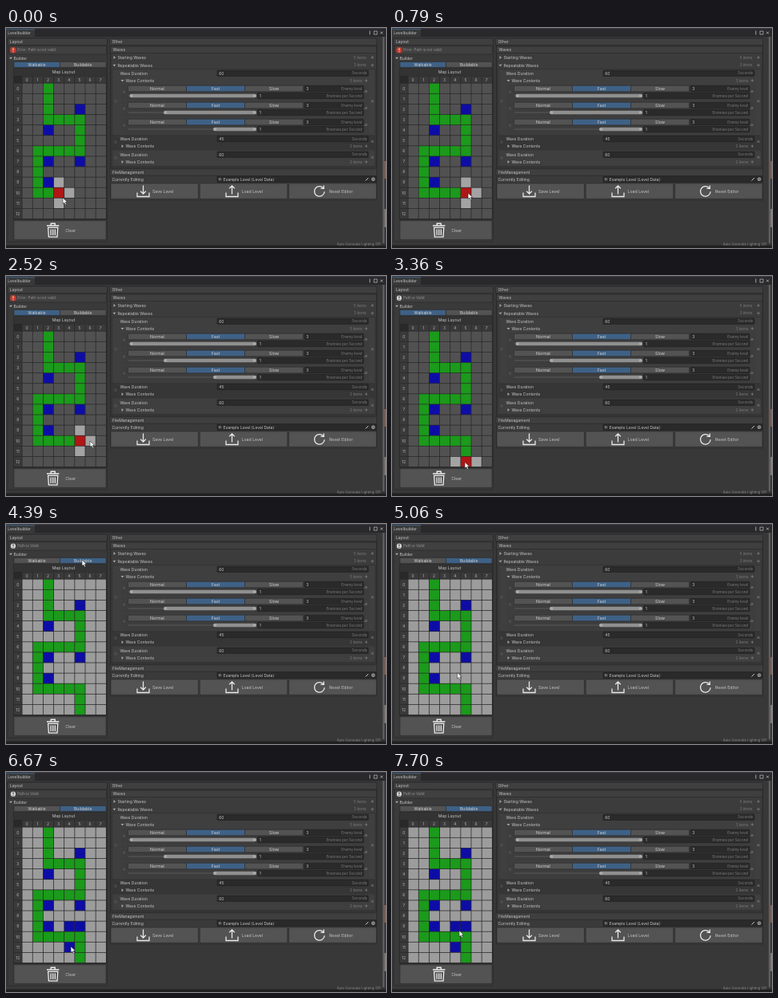
Recreate the animation shown at these times as an HTML page. Size 475 px wide and 276 px high, loop 7.73 s.

```html
<!DOCTYPE html>
<html lang="en">
<head>
<meta charset="utf-8">
<title>Level editor</title>
<style>
html, body { margin: 0; width: 100%; height: 100%; overflow: hidden; background: #383838; }
svg { display: block; width: 475px; height: 276px; }
text { font-family: Inter, Roboto, sans-serif; }
</style>
</head>
<body>
<svg id="stage" viewBox="0 0 475 276"></svg>
<script>
const stage = document.getElementById('stage');
const LOOP = 7730, COLS = 8, ROWS = 13, LEFT = 20.1, TOP = 69.2, CELL_W = 13.15, CELL_H = 13.1, GAP = 0.38;
const INK = '#c6c6c6', DIM = '#7b7b7b', EDGE = '#272727', BUTTON = '#535353', ACTIVE = '#3f6186';
const GREEN = '#1b9a1b', BLUE = '#0d0da6', RED = '#b01616', OPEN = '#a3a3a3', EMPTY = '#525152', FREE = '#9c9c9c';

function add(tag, attrs, parent = stage) {
  const node = document.createElementNS('http://www.w3.org/2000/svg', tag);
  for (const key in attrs) node.setAttribute(key, attrs[key]);
  return parent.appendChild(node);
}
function box(x, y, right, bottom, fill, stroke = 'none', rx = 0) {
  return add('rect', { x, y, width: right - x, height: bottom - y, fill, stroke, rx, 'stroke-width': 0.6 });
}
function label(x, y, words, fill = INK, anchor = 'start', size = 5) {
  const node = add('text', { x, y: y + size * 0.36, fill, 'text-anchor': anchor, 'font-size': size });
  node.textContent = words;
  return node;
}
function line(d, stroke = INK, width = 0.8) {
  return add('path', { d, stroke, fill: 'none', 'stroke-width': width });
}
function fold(x, y, open) {
  add('path', { d: `M${x} ${y}` + (open ? 'm-2-1h4l-2 2.6z' : 'm-1-2v4l2.6-2z'), fill: '#a5a5a5' });
}
function cross(x, y, stroke = '#8c8c8c') {
  line(`M${x - 1.5} ${y - 1.5}l3 3m0-3l-3 3`, stroke, 0.7);
}
function plus(x, y) { line(`M${x - 1.8} ${y}h3.6m-1.8-1.8v3.6`, '#909090', 0.6); }
function grip(x, y) { line(`M${x - 1.5} ${y - 0.8}h3m-3 1.8h3`, '#707070', 0.5); }
function header(x, y, right, words) {
  box(x, y, right, y + 8.4, '#3f3f3f', EDGE);
  label(x + 3, y + 4.2, words);
}
function field(x, y, right, value, hint) {
  box(x, y - 3.7, right, y + 3.7, '#2a2a2a', '#212121', 0.8);
  label(x + 2.2, y, value);
  label(right - 1.8, y, hint, DIM, 'end', 4.6);
}
function button(x, y, right, bottom, fill = BUTTON) {
  return box(x, y, right, bottom, fill, '#2b2b2b', 0.8);
}

function drawWindow() {
  box(0, 0, 475, 276, '#383838');
  box(0, 0, 475, 11, '#29282b');
  box(0, 0, 475, 1.4, '#3a393d');
  box(0, 1.4, 36, 11, '#383838');
  box(0, 1.2, 36, 2.2, ACTIVE);
  label(2.2, 6.4, 'Levelbuilder');
  line('M454.8 3.4v5', '#a0a8a0', 1);
  box(460, 4, 464, 8, 'none', '#d8d8d8');
  cross(469.5, 6, '#d8d8d8');
  box(0, 272.6, 475, 276, '#202020');
  label(468, 271, 'Auto Generate Lighting Off', '#858585', 'end', 4.3);
  box(470.8, 11, 473.2, 270, '#5e5e5e');
  box(473.2, 11, 475, 272, '#3a3538');
  box(473.2, 167, 475, 189, '#96604c');
  box(473.2, 227, 475, 250, '#8a807c');
}

function drawLayoutPanel() {
  box(2, 13, 126.5, 268, '#3a3a3a', EDGE);
  header(2, 13, 126.5, 'Layout');
  box(3.5, 22.5, 125.5, 33, '#404040', EDGE, 1);
  fold(6, 37.7, true);
  label(9.5, 37.7, 'Builder');
  box(9.5, 50, 125.3, 240.5, '#333333', EDGE);
  label(72, 55.3, 'Map Layout', INK, 'middle', 5.2);
  box(9.5, 60, 125.3, 240, '#292929');
  for (let c = 0; c < COLS; c++) {
    const x = LEFT + c * CELL_W;
    box(x + GAP, 60.5, x + CELL_W - GAP, TOP - GAP, '#3a3a3a');
    label(x + CELL_W / 2 - 0.5, 65, c, '#b0b0b0', 'middle');
  }
  for (let r = 0; r < ROWS; r++) {
    const y = TOP + r * CELL_H;
    box(10, y + GAP, LEFT - GAP, y + CELL_H - GAP, '#3a3a3a');
    label(14.8, y + CELL_H / 2, r, '#b0b0b0', 'middle');
  }
  button(10, 241.8, 125, 265.5);
  line('M51 248h15.4m-10.2 0v-2.8h5v2.8', '#ececec', 1.4);
  line('M52.6 250.4l.8 11.8h10.6l.8-11.8zm3.5 2v7.6m2.6-7.6v7.6m2.6-7.6v7.6', '#ececec', 1.3);
  label(74.2, 253.7, 'Clear', INK, 'start', 5.2);
}

function drawEnemy(y, start) {
  box(144, y - 5, 454, y + 14.5, '#3d3d3d');
  grip(147.5, y + 4);
  ['Normal', 'Fast', 'Slow'].forEach((name, i) => {
    const x = 152.5 + i * 73;
    button(x, y - 3.8, x + 73, y + 3.8, i === 1 ? ACTIVE : BUTTON);
    label(x + 36.5, y, name, '#d4d4d4', 'middle', 5.2);
  });
  field(373, y, 447, '3', 'Enemy level');
  box(153, y + 8.5, 313, y + 9.5, '#5b5b5b');
  box(start, y + 6.7, 313, y + 11.3, '#8f8f8f', 'none', 2.3);
  for (const cx of [start + 2.3, 310.7]) add('circle', { cx, cy: y + 9, r: 2.1, fill: '#a9a9a9' });
  field(314.5, y + 9, 447, '1', 'Enemies per Second');
  cross(450, y + 3.5);
}

function drawWave(y, seconds, open) {
  label(142.4, y, 'Wave Duration');
  field(264, y, 453, seconds, 'Seconds');
  fold(145.5, y + 9.2, open);
  label(149.4, y + 9.2, 'Wave Contents');
  label(445.5, y + 9.2, (open ? 3 : 2) + ' items', DIM, 'end', 4.6);
  plus(450.3, y + 9.2);
  grip(137, y + (open ? 35 : 4));
  cross(458, y + (open ? 35 : 3.5));
}

function drawWavesPanel() {
  box(130.5, 13, 463.5, 216, '#3a3a3a', EDGE);
  header(129.5, 13, 463.5, 'Other');
  box(131, 23, 463, 175, '#3c3c3c', EDGE);
  header(130.5, 23, 463, 'Waves');
  [['Starting Waves', 37, 0], ['Repeatable Waves', 46.7, 3]].forEach(([name, y, count]) => {
    fold(135.5, y, count > 0);
    label(139.4, y, name);
    label(450.5, y, count + ' items', DIM, 'end', 4.6);
    plus(458, y);
  });
  box(133, 51.5, 461.5, 173.5, '#3f3f3f', '#303030');
  box(133, 134, 461.5, 153.5, '#363636');
  drawWave(56.8, '60', true);
  [154.5, 197, 259].forEach((start, i) => drawEnemy(76 + i * 21, start));
  drawWave(139, '45', false);
  drawWave(158.8, '60', false);
}

function drawFilePanel() {
  header(130, 176.8, 463.5, 'FileManagement');
  label(132.4, 189.7, 'Currently Editing');
  box(264, 186, 463, 193.4, '#2a2a2a', '#212121', 0.8);
  line('M266.5 188v3.4m1.8-3.4v3.4', '#bdbdbd', 0.7);
  label(271.4, 189.7, 'Example Level (Level Data)');
  line('M449.5 191.5l3.5-3.5', '#c8c8c8', 1);
  add('circle', { cx: 459, cy: 189.7, r: 2, fill: '#777', stroke: '#b5b5b5', 'stroke-width': 0.6 });
  const icons = [
    'M164 206.5v5h15v-5M171.5 197.5v10.5m-3.3-3.3l3.3 3.3 3.3-3.3',
    'M275 206.5v5h15v-5M282.5 208.5v-10.5m-3.3 3.3l3.3-3.3 3.3 3.3',
    'M396.6 200.8a6.3 6.3 0 1 0 1.5 4.4M397.3 197.5v3.8h-3.8'
  ];
  ['Save Level', 'Load Level', 'Reset Editor'].forEach((name, i) => {
    const x = 131 + i * 111.3;
    button(x, 195, x + 109.4, 214.3);
    line(icons[i], '#e8e8e8', 1.3);
    label([183, 294.5, 404][i], 204.8, name, INK, 'start', 5.2);
  });
}

drawWindow();
drawLayoutPanel();
drawWavesPanel();
drawFilePanel();

const badge = add('circle', { cx: 9, cy: 27.7, r: 3.8 });
const badgeMark = line('M9 25.3v2.8m0 1v1', '#f0f0f0', 1);
const status = label(14.2, 27.8, '', '#929292', 'start', 4.6);
const tabs = ['Walkable', 'Buildable'].map((name, i) => {
  const x = 10 + i * 57.5;
  const tab = button(x, 42.4, x + 57.5, 49.4);
  label(x + 28.7, 46, name, '#d4d4d4', 'middle', 5.2);
  return tab;
});
const cells = Array.from({ length: COLS * ROWS }, (_, i) => {
  const x = LEFT + i % COLS * CELL_W, y = TOP + Math.floor(i / COLS) * CELL_H;
  return box(x + GAP, y + GAP, x + CELL_W - GAP, y + CELL_H - GAP, EMPTY);
});
const cursor = add('path', {
  d: 'M0 0v7.6l1.8-1.6 1.3 2.8 1.4-.6-1.3-2.8h2.5z', fill: '#fff', stroke: '#151515', 'stroke-width': 0.5
});

const id = (c, r) => r * COLS + c;
const corners = [[2, 0], [2, 3], [5, 3], [5, 6], [1, 6], [1, 10], [3, 10]];
const startTrail = [id(2, 0)];
for (let i = 1; i < corners.length; i++) {
  let [c, r] = corners[i - 1];
  const [endC, endR] = corners[i];
  while (c !== endC || r !== endR) {
    c += Math.sign(endC - c);
    r += Math.sign(endR - r);
    startTrail.push(id(c, r));
  }
}
// An edit without a cell undoes the last step.
const edits = [[380, 4, 10], [730, 5, 10], [1080, 6, 10], [1480, 6, 11], [1800], [2200], [2860, 5, 11], [3240, 5, 12]];
const towers = [[0, 5, 2], [0, 2, 4], [0, 2, 7], [0, 5, 7], [0, 2, 9], [5250, 4, 9], [5640, 5, 9], [6500, 4, 11]];
const BUILD_AT = 4280;
const moves = [
  [0, 71, 213], [330, 81, 208], [430, 82, 208], [680, 94, 207], [780, 95, 207], [1030, 107, 208],
  [1120, 107, 209], [1430, 108, 221], [1640, 109, 223], [1820, 109, 222], [2100, 105, 207], [2520, 105, 207],
  [2800, 92, 221], [2900, 92, 222], [3180, 91, 233], [3500, 91, 234], [4200, 95, 45], [4450, 95, 45],
  [5150, 81, 193], [5330, 81, 193], [5580, 93, 192], [5760, 93, 193], [5950, 93, 194], [6400, 81, 219],
  [6650, 81, 219], [7090, 88, 207], [7210, 88, 207], [7700, 84, 199]
];

function cursorAt(t) {
  const next = moves.findIndex(move => move[0] > t);
  if (next < 0) return moves[moves.length - 1].slice(1);
  const [t0, x0, y0] = moves[next - 1], [t1, x1, y1] = moves[next];
  const u = (t - t0) / (t1 - t0), e = u * u * (3 - 2 * u);
  return [x0 + (x1 - x0) * e, y0 + (y1 - y0) * e];
}

function render(t) {
  const building = t >= BUILD_AT;
  const trail = startTrail.slice();
  for (const [at, c, r] of edits) {
    if (at > t) break;
    if (c === undefined) trail.pop();
    else trail.push(id(c, r));
  }
  const head = trail[trail.length - 1];
  const colors = new Array(COLS * ROWS).fill(building ? FREE : EMPTY);
  if (!building) {
    const c = head % COLS, r = Math.floor(head / COLS);
    for (const [nc, nr] of [[c - 1, r], [c + 1, r], [c, r - 1], [c, r + 1]]) {
      if (nc >= 0 && nc < COLS && nr >= 0 && nr < ROWS) colors[id(nc, nr)] = OPEN;
    }
  }
  trail.forEach(cell => { colors[cell] = GREEN; });
  towers.forEach(([at, c, r]) => { if (t >= at) colors[id(c, r)] = BLUE; });
  if (!building) colors[head] = RED;
  cells.forEach((cell, i) => cell.setAttribute('fill', colors[i]));

  const valid = head >= id(0, ROWS - 1);
  status.textContent = valid ? 'Path is Valid' : 'Error: Path is not valid';
  badge.setAttribute('fill', valid ? '#d4d4d4' : '#c63a2c');
  badge.setAttribute('r', valid ? 3.1 : 3.8);
  badgeMark.setAttribute('stroke', valid ? '#404040' : '#f0f0f0');
  tabs.forEach((tab, i) => tab.setAttribute('fill', building === (i === 1) ? ACTIVE : BUTTON));
  cursor.setAttribute('transform', `translate(${cursorAt(t)})`);
}

const began = performance.now();
function tick() {
  render((performance.now() - began) % LOOP);
  requestAnimationFrame(tick);
}
tick();
</script>
</body>
</html>
```
